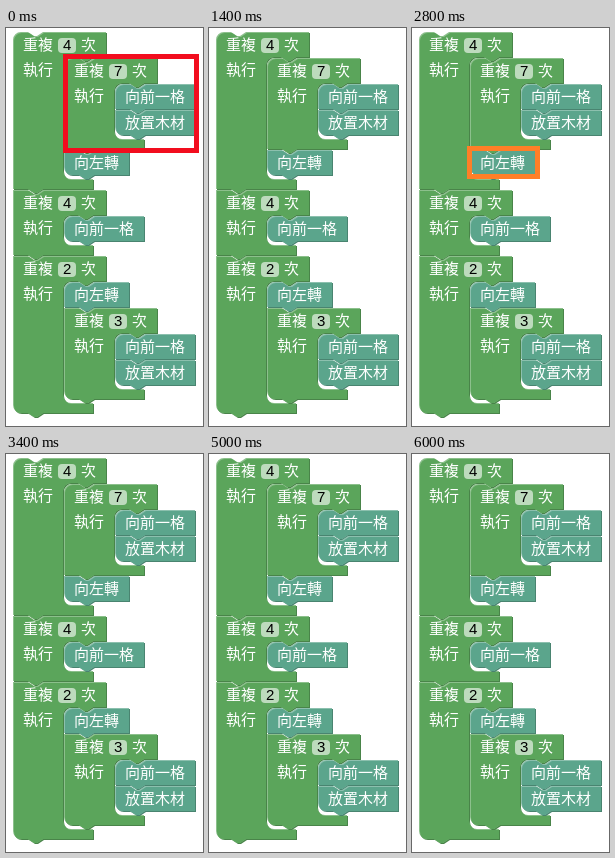
An HTML page with a canvas for the animation above (6200 ms loop, 197 px wide and 398 px high).

```html
<!DOCTYPE html>
<html lang="zh-Hant">
<head>
<meta charset="utf-8">
<style>
  html, body { margin: 0; width: 100%; height: 100%; overflow: hidden; background: #fff; }
  canvas { display: block; }
</style>
</head>
<body>
<canvas id="stage" width="197" height="398"></canvas>
<script>
const ctx = document.getElementById('stage').getContext('2d');
const GREEN = { base: '#5ba55b', light: '#8cc08c', dark: '#498449' };
const TEAL = { base: '#5ba58c', light: '#8cc0ae', dark: '#498470' };
const CJK = '15px "Noto Sans CJK TC", "Noto Sans CJK", "Noto Sans CJK JP", sans-serif';
const DIGIT = '15px "Liberation Sans", Arial, sans-serif';
const ROW = 26, FOOT = 14, FOOT_BAR = 11, INDENT = 51;
const STEP = 200, LOOP = 6200;

const act = text => ({ text });
const repeat = (count, ...body) => ({ count, body });
const forward = act('向前一格'), place = act('放置木材'), left = act('向左轉');
const program = [
  repeat(4, repeat(7, forward, place), left),
  repeat(4, forward),
  repeat(2, left, repeat(3, forward, place))
];

const sum = blocks => blocks.reduce((h, b) => h + heightOf(b), 0);
const heightOf = b => b.body ? ROW + sum(b.body) + FOOT : ROW;

// Outline of a block; a loop gets a C-shaped opening
function outline(x, y, w, h, roundTop, roundBottom, isLoop) {
  const p = new Path2D();
  const line = (dx, dy) => p.lineTo(x + dx, y + dy);
  const curve = (cx, cy, dx, dy) => p.arcTo(x + cx, y + cy, x + dx, y + dy, 8);
  const tab = (dx, dy) => {
    line(dx + 30, dy); line(dx + 24, dy + 4); line(dx + 21, dy + 4); line(dx + 15, dy);
  };
  if (roundTop) {
    p.moveTo(x, y + 8);
    curve(0, 0, 8, 0);
  } else p.moveTo(x, y);
  line(15, 0); line(21, 4); line(24, 4); line(30, 0); line(w, 0);
  if (isLoop) {
    const floor = h - FOOT_BAR;
    line(w, 25);
    tab(50, 25);
    line(58, 25);
    curve(50, 25, 50, 33);
    line(50, floor - 8);
    curve(50, floor, 58, floor);
    line(80, floor); line(80, h - 1);
  } else line(w, h - 1);
  tab(0, h - 1);
  if (roundBottom) {
    line(8, h - 1);
    curve(0, h - 1, 0, h - 9);
  } else line(0, h - 1);
  p.closePath();
  return p;
}

function emboss(path, shifted, color) {
  ctx.fillStyle = color.dark;
  ctx.fill(shifted);
  ctx.fillStyle = color.light;
  ctx.fill(path);
  ctx.save();
  ctx.clip(path);
  ctx.fillStyle = color.base;
  ctx.fill(shifted);
  ctx.restore();
}

function label(text, x, y, font = CJK, color = '#fff') {
  ctx.font = font;
  ctx.fillStyle = color;
  ctx.fillText(text, x, y);
}

function drawBlock(b, x, y, first, last) {
  const h = heightOf(b);
  const w = b.body ? 93 : 20 + 15 * b.text.length;
  const shape = d => outline(x + d, y + d, w, h, first, last, !!b.body);
  emboss(shape(0), shape(1), b.body ? GREEN : TEAL);
  if (!b.body) {
    label(b.text, x + 10, y + 18);
    return;
  }
  label('重複', x + 10, y + 18);
  ctx.fillStyle = '#bddbbd';
  ctx.beginPath();
  ctx.roundRect(x + 45, y + 6, 18, 15, 4);
  ctx.fill();
  label(b.count, x + 50, y + 18, DIGIT, '#000');
  label('次', x + 68, y + 18);
  label('執行', x + 10, y + 43);
  drawStack(b.body, x + INDENT, y + ROW);
}

function drawStack(blocks, x, y) {
  blocks.forEach((b, i) => {
    drawBlock(b, x, y, i === 0, i === blocks.length - 1);
    y += heightOf(b);
  });
}

// Highlight frames: left, top, right, bottom, colour
const marks = {
  A: [57, 26, 193, 125, '#f20d1e'],
  B: [55, 118, 128, 151, '#ff7f27'],
  C: [55, 184, 144, 217, '#ffe800'],
  D: [55, 251, 129, 284, '#00a2e8'],
  E: [57, 278, 190, 376, '#a349a4']
};
const order = 'A-B-'.repeat(4) + 'C-'.repeat(4) + 'D-E-DE-';

function drawMark([l, t, r, b, color]) {
  ctx.strokeStyle = color;
  ctx.lineWidth = 5;
  ctx.strokeRect(l + 2.5, t + 2.5, r - l - 5, b - t - 5);
}

let start;
function frame(now) {
  start ??= now;
  const mark = marks[order[Math.floor((now - start) % LOOP / STEP)]];
  ctx.fillStyle = '#fff';
  ctx.fillRect(0, 0, 197, 398);
  drawStack(program, 7, 4);
  if (mark) drawMark(mark);
  requestAnimationFrame(frame);
}
requestAnimationFrame(frame);
</script>
</body>
</html>
```
